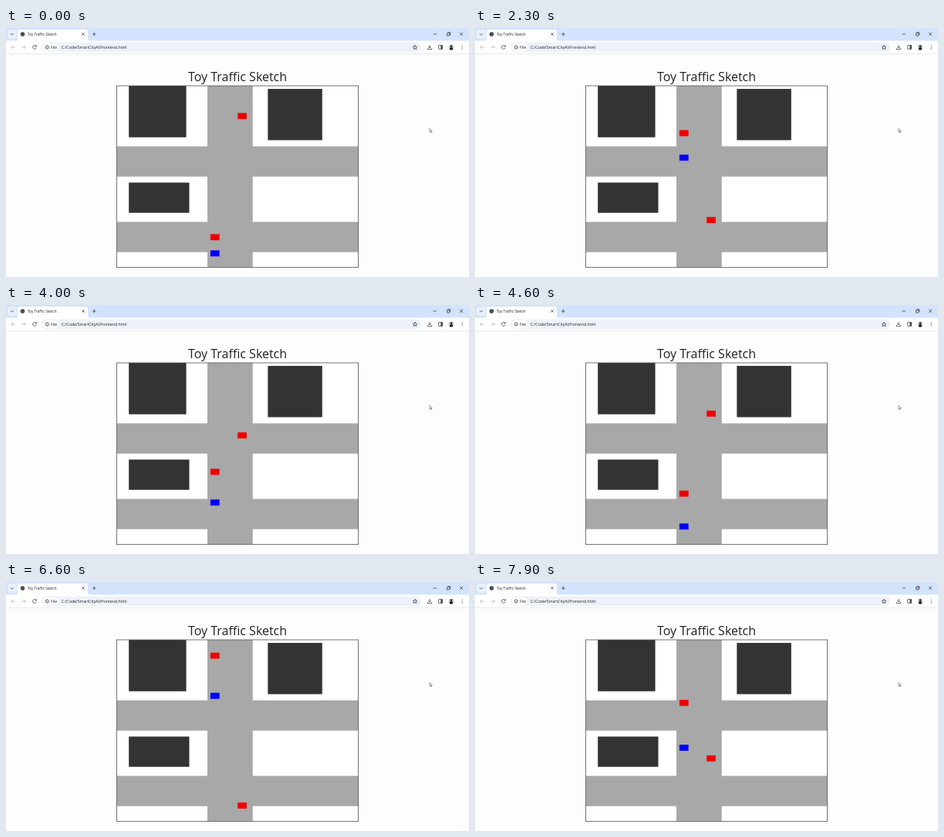
These frames come from a looping animation (600 px wide and 323 px high, 8 s). An HTML page:

```html
<!DOCTYPE html>
<html lang="en">
<head>
<meta charset="utf-8">
<title>Toy Traffic Sketch</title>
<style>
  html, body { margin: 0; width: 100%; height: 100%; overflow: hidden; background: #fdfdfd; }
  svg { display: block; width: 100%; height: 100%; }
  text { font-family: "Open Sans", "Noto Sans", sans-serif; fill: #222; }
  .icon { fill: none; stroke: #444; stroke-width: .8; }
  .pale { stroke: #b4b4b4; }
</style>
</head>
<body>
<svg viewBox="0 0 600 323">
  <!-- tab strip -->
  <rect width="600" height="17" fill="#d3e3fd"/>
  <rect x="2" y="2" width="12" height="12" rx="3.5" fill="#e8f0fe"/>
  <path class="icon" d="M6 7.2l2 2 2-2"/>
  <path d="M12 17q3 0 3-3V5q0-3 3-3h85q3 0 3 3v9q0 3 3 3z" fill="#fff"/>
  <circle cx="21.5" cy="8" r="2.8" fill="#4a4d51"/>
  <text x="28" y="9.8" font-size="4.7">Toy Traffic Sketch</text>
  <path class="icon" d="M98.4 6.4l3.2 3.2m0-3.2l-3.2 3.2M112 8h4.6M114.3 5.7v4.6"/>
  <path class="icon" d="M553.5 8h4.5M571.5 6.8h3.2v3.2h-3.2zM572.6 6.6v-.9h3.2v3.2h-.9M588 5.8l4.2 4.2m0-4.2l-4.2 4.2"/>

  <!-- toolbar -->
  <rect y="16.5" width="600" height="17" fill="#fff"/>
  <rect x="46" y="18.5" width="492" height="12.8" rx="6.4" fill="#edf2fa"/>
  <rect y="33.3" width="600" height=".7" fill="#dfe3e8"/>
  <path class="icon pale" d="M11.8 25H6.8m2.2-2.2L6.8 25 9 27.2M20.5 25h5m-2.2-2.2l2.2 2.2-2.2 2.2"/>
  <path class="icon" d="M39.1 23.7a2.4 2.4 0 1 0 .2 2M39.4 22.1v1.9h-1.9"/>
  <rect x="48" y="20" width="20" height="10" rx="5" fill="#fff"/>
  <circle class="icon" cx="53.3" cy="25" r="2.2" stroke-width=".6"/>
  <path class="icon" d="M53.3 24.7v1.4M53.3 23.5v.6"/>
  <text x="58" y="26.9" font-size="5.2">File</text>
  <text x="71.8" y="26.9" font-size="5.2">C:/Code/SmartCityAI/frontend.html</text>
  <path class="icon" stroke-width=".6" d="M530 22.2l.8 1.9 2 .2-1.5 1.3.5 2-1.8-1.1-1.8 1.1.5-2-1.5-1.3 2-.2z"/>
  <path class="icon" d="M549 22v4m-1.8-1.8L549 26l1.8-1.8M546.3 26v1.7h5.4V26"/>
  <rect class="icon" x="560.6" y="22.4" width="5" height="5" rx=".6"/>
  <rect x="563.4" y="22.4" width="2.2" height="5" fill="#444"/>
  <circle cx="577" cy="25" r="3.7" fill="#d5d7da"/>
  <path d="M575 28.1v-2.4q2-1.5 4 0v2.4q-2 1-4 0z" fill="#222"/>
  <circle cx="577" cy="23.6" r="1.4" fill="#222"/>
  <path d="M590.7 22.5h1v1h-1zM590.7 24.5h1v1h-1zM590.7 26.5h1v1h-1z" fill="#444"/>

  <!-- page -->
  <text x="300" y="69" font-size="16" font-weight="500" text-anchor="middle">Toy Traffic Sketch</text>
  <svg x="143.5" y="75" width="313.3" height="235.4" viewBox="0 0 800 600" preserveAspectRatio="none">
    <rect width="800" height="600" fill="#fff"/>
    <path d="M300 0h150v600H300zM0 200h800v100H0zM0 450h800v100H0z" fill="#a8a8a8"/>
    <path d="M40 0h190v170H40zM500 10h180v170H500zM40 320h200v100H40z" fill="#333"/>
    <g id="cars"></g>
  </svg>
  <rect x="143.5" y="75" width="313.1" height="235.4" fill="none" stroke="#505050" stroke-width=".8"/>
  <path d="M549 130.4v4.7l1.1-1 .8 1.7.7-.3-.8-1.7h1.5z" fill="#fff" stroke="#333" stroke-width=".5"/>
</svg>
<script>
  const LOOP = 8000, STEP = 100;
  const CAR_W = 30, CAR_H = 20, SPAN = 600 + CAR_H;

  // start and speed in canvas units and units per second
  const cars = [
    { x: 310, start: 490.5, speed: 120, color: "#ee0000" },
    { x: 310, start: 544, speed: 132, color: "#0000fa" },
    { x: 400, start: 90, speed: -120, color: "#ee0000" }
  ];

  const lane = document.getElementById("cars");
  for (const car of cars) {
    car.el = document.createElementNS("http://www.w3.org/2000/svg", "rect");
    const attrs = { x: car.x, width: CAR_W, height: CAR_H, fill: car.color };
    for (const key in attrs) car.el.setAttribute(key, attrs[key]);
    lane.append(car.el);
  }

  const wrap = y => ((y + CAR_H) % SPAN + SPAN) % SPAN - CAR_H;

  function draw() {
    const seconds = Math.floor(performance.now() % LOOP / STEP) * STEP / 1000;
    for (const car of cars) {
      car.el.setAttribute("y", wrap(car.start + car.speed * seconds));
    }
    requestAnimationFrame(draw);
  }
  draw();
</script>
</body>
</html>
```
